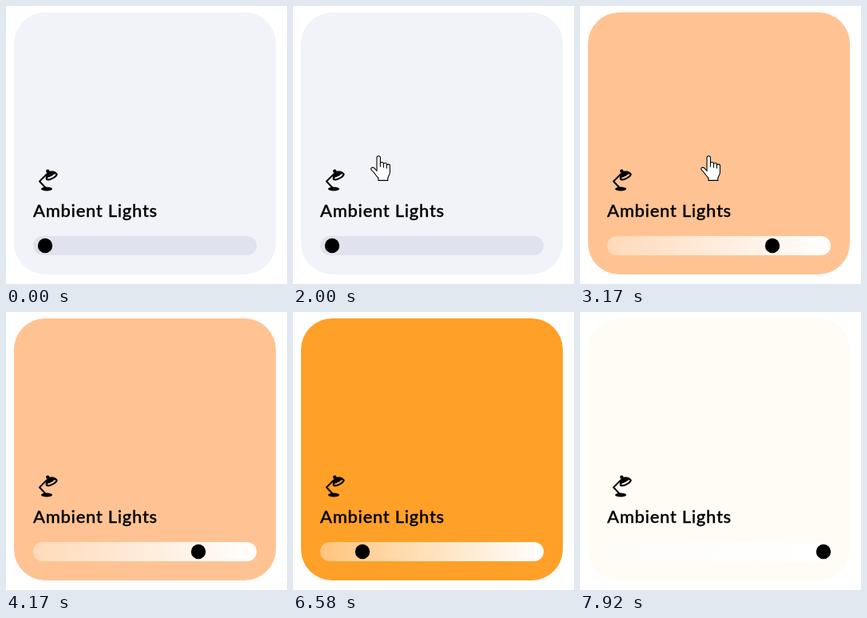
An HTML page that plays this animation: 352x348 px, repeating every 8 s.

```html
<!DOCTYPE html>
<html lang="en">
<head>
<meta charset="utf-8">
<title>Ambient Lights</title>
<style>
  html, body { margin: 0; width: 100%; height: 100%; overflow: hidden; background: #fff; }
  svg { display: block; width: 352px; height: 348px; }
  text { font: 500 22px Lato, sans-serif; letter-spacing: .7px; stroke: #000; stroke-width: .35px; }
</style>
</head>
<body>
<svg viewBox="0 0 352 348">
  <defs>
    <linearGradient id="glow">
      <stop id="from" offset="0"/>
      <stop id="to" offset="1"/>
    </linearGradient>
  </defs>
  <rect id="card" x="10" y="8" width="328" height="328" rx="39"/>

  <g id="lamp" fill="none" stroke="#000" stroke-width="2" stroke-linecap="round" stroke-linejoin="round">
    <path d="M51 210.5L42 219.5L50 228"/>
    <path fill="#000" stroke-width="1" d="M50.3 217C49.6 212 51.5 207.5 56 207C60 206.5 63 208 64 210.3Z"/>
    <ellipse id="shade" cx="57.2" cy="213.3" rx="6.9" ry="2.7" transform="rotate(-27 57.2 213.3)"/>
    <path stroke-width="3" d="M53.5 212.8L58 210.7"/>
    <circle cx="52.3" cy="206.8" r="2.2" fill="#000" stroke="none"/>
    <ellipse cx="51" cy="229" rx="7" ry="2.4" fill="#000" stroke="none"/>
  </g>

  <text x="34" y="264">Ambient Lights</text>
  <rect x="34" y="288" width="280" height="24" rx="12" fill="url(#glow)"/>
  <circle id="knob" cy="300" r="9.2"/>

  <path id="hand" fill="#fff" stroke="#000" stroke-width="1.1" stroke-linejoin="round"
    d="M8 19.5V3A2.2 2.2 0 0 1 12.4 3V14V10.5C12.4 7.8 16.4 7.8 16.4 10.5V15V11.5C16.4 8.8 20.4 8.8 20.4 11.5V16V13C20.4 10.5 24.4 10.5 24.4 13V21C24.4 25 22 26 21.8 28.5V31.4H10V28.5C6.5 25 4.5 21 1.2 18.2C-.5 16 2.6 13.8 5 16.2Z"/>
</svg>
<script>
  const LOOP = 8000;
  const $ = id => document.getElementById(id);

  // start time, card, track start, track end, knob x
  const scenes = [
    [0, '#f2f3f9', '#e0e2ee', '#e0e2ee', 49],
    [2080, '#ffc393', '#ffdab9', '#fff', 241],
    [4750, '#ffa028', '#ffc57c', '#fff', 87],
    [6750, '#fffcf5', '#fdfcf9', '#fff', 305]
  ];

  // start time, hand x, hand y; moves in steps of 1/12 s
  const path = [
    [80, 97, 187],
    [3000, 97, 187],
    [3500, 258, 187],
    [3917, 258, 187],
    [4083, 298, 13],
    [4165, 298, 13]
  ];

  const fill = (id, color) => $(id).setAttribute('fill', color);

  function showScene(t) {
    const [, card, from, to, x] = scenes.findLast(s => t >= s[0]);
    fill('card', card);
    fill('shade', card);
    $('from').setAttribute('stop-color', from);
    $('to').setAttribute('stop-color', to);
    $('knob').setAttribute('cx', x);
  }

  function moveHand(t) {
    const i = path.findLastIndex(p => t >= p[0]);
    const visible = i >= 0 && i < path.length - 1;
    $('hand').setAttribute('visibility', visible ? 'visible' : 'hidden');
    if (!visible) return;
    const [t0, x0, y0] = path[i], [t1, x1, y1] = path[i + 1];
    const step = 1000 / 12;
    const k = Math.min(1, Math.floor((t - t0 + 4) / step) * step / (t1 - t0));
    const x = Math.round(x0 + (x1 - x0) * k), y = Math.round(y0 + (y1 - y0) * k);
    $('hand').setAttribute('transform', `translate(${x} ${y})`);
  }

  const start = performance.now();
  function draw() {
    const t = (performance.now() - start) % LOOP;
    showScene(t);
    moveHand(t);
    requestAnimationFrame(draw);
  }
  draw();
</script>
</body>
</html>
```
